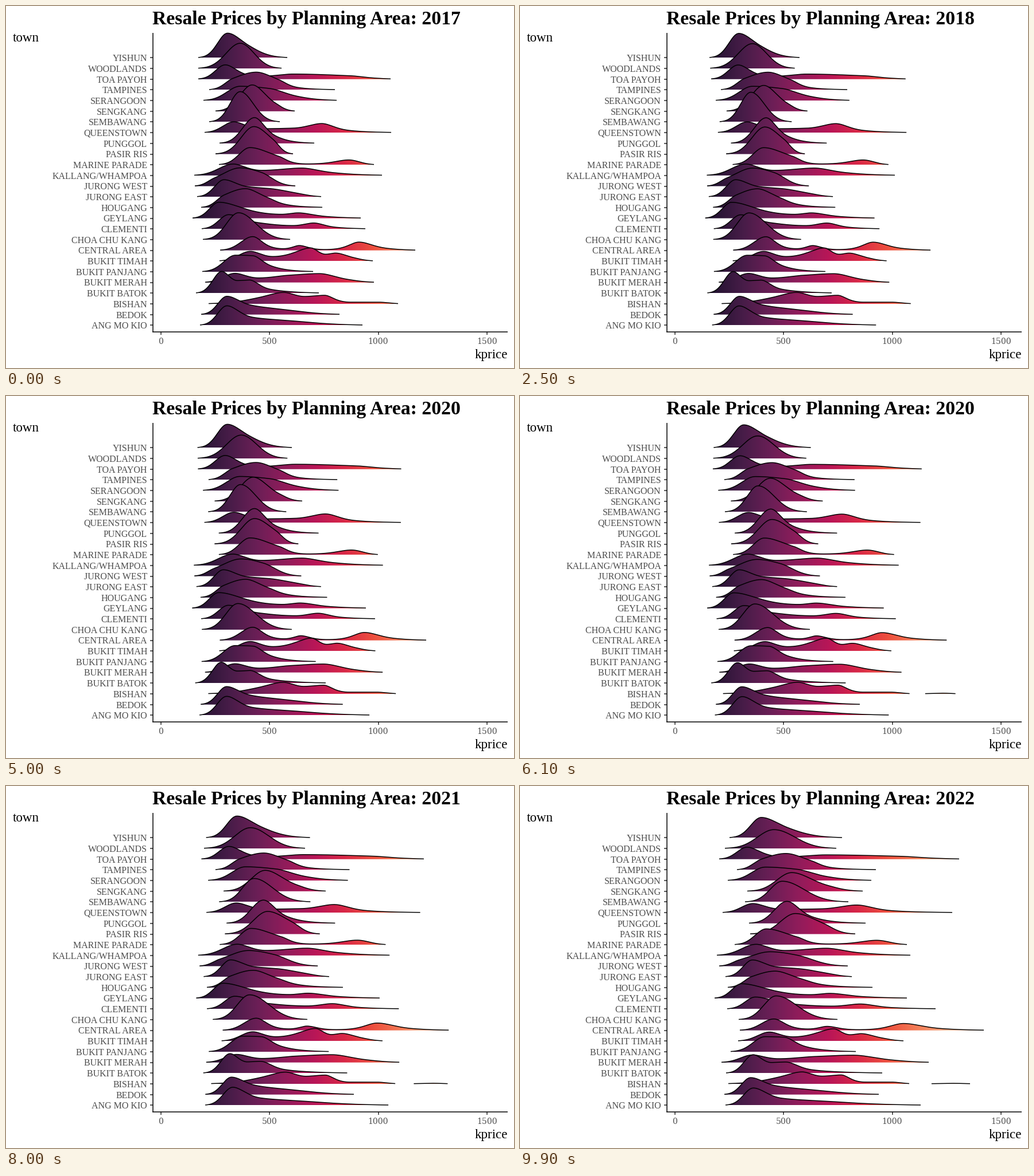
Animation of 885 by 632 pixels, one loop 10000 ms. Source, as a matplotlib script:

```python
import numpy as np
import matplotlib.pyplot as plt
from matplotlib.animation import FuncAnimation
from matplotlib.path import Path

W, H, DPI = 885, 632, 100
FRAMES = 100
LEFT, RIGHT, TOP, FLOOR = 255.5, 874, 47, 568.5
FILL_X = (283, 846)
TRIM = 0.5  # height in px where a ridge is cut off

ROCKET = ["#03051a", "#221331", "#451c47", "#6a1f56", "#921c5b", "#b91657",
          "#d92847", "#ed503e", "#f47d57", "#f6a47b", "#f7c9aa", "#faebdd"]
GREY = "#4d4d4d"

plt.rcParams["font.family"] = "Liberation Serif"
fig = plt.figure(figsize=(W / DPI, H / DPI), dpi=DPI, facecolor="white")
ax = fig.add_axes([0, 0, 1, 1])
ax.axis("off")


def pt(px):
    return px * 72 / DPI


def label(x, y, s, size, **kw):
    return ax.text(x, y, s, fontsize=pt(size), va="baseline", **kw)


def stroke(xs, ys, width, color="black", z=100):
    return ax.plot(xs, ys, color=color, lw=pt(width), zorder=z,
                   solid_capstyle="butt", solid_joinstyle="round")[0]


def base_y(row):
    return 90.4 + 18.68 * row


def make_gradient():
    rgb = np.array([[int(c[i:i + 2], 16) for i in (1, 3, 5)] for c in ROCKET])
    at = np.linspace(0, len(ROCKET) - 1, FILL_X[1] - FILL_X[0])
    cols = [np.interp(at, range(len(ROCKET)), ch) for ch in rgb.T]
    return np.stack(cols, axis=-1).astype(np.uint8)[None]


GRADIENT = make_gradient()


def market(step):
    """Price level and elapsed share: a dip, then a climb, linear within a year."""
    elapsed = step / (FRAMES - 1)
    years = np.linspace(0, 1, 6)
    return np.interp(elapsed, years, years * (2.3 * years - 1.3)), elapsed


def density(x, h, n=180):
    """Monotone cubic through the knots in log height, so tails are Gaussian."""
    y = np.log(h)
    step = np.diff(x)
    sec = np.diff(y) / step
    a, b = sec[:-1], sec[1:]
    same = a * b > 0
    inner = np.where(same, 2 * a * b / np.where(same, a + b, 1), 0)
    d = np.r_[max(2 * sec[0] - inner[0], 0), inner, min(2 * sec[-1] - inner[-1], 0)]
    xs = np.linspace(x[0], x[-1], n)
    k = np.clip(np.searchsorted(x, xs, "right") - 1, 0, len(step) - 1)
    u = (xs - x[k]) / step[k]
    ys = ((1 + 2 * u) * (1 - u) ** 2 * y[k] + u * u * (3 - 2 * u) * y[k + 1]
          + step[k] * u * (1 - u) * ((1 - u) * d[k] - u * d[k + 1]))
    return xs, np.exp(ys)


class Ridge:
    """A town's density; it shifts and stretches while its area stays the same."""

    def __init__(self, row, rise, stretch, knots, since=0):
        self.base, self.rise, self.stretch, self.since = base_y(row), rise, stretch, since
        self.x = np.r_[knots[0], knots[1:-1:2], knots[-1]].astype(float)
        self.h = np.r_[TRIM, knots[2:-1:2], TRIM]
        self.area = np.trapezoid(*density(self.x, self.h)[::-1])
        self.fill = ax.imshow(GRADIENT, aspect="auto", interpolation="nearest",
                              extent=(*FILL_X, self.base, self.base - 60),
                              zorder=2 + row)
        self.line = stroke([], [], 1.5, z=2.5 + row)

    def update(self, step):
        shown = step >= self.since
        self.fill.set_visible(shown)
        self.line.set_visible(shown)
        price, elapsed = market(step)
        along = (self.x - self.x[0]) / (self.x[-1] - self.x[0])
        x = self.x + self.rise * price + self.stretch * (price + elapsed) / 2 * along ** 2
        xs, hs = density(x, self.h)
        ys = self.base - hs * self.area / np.trapezoid(hs, xs)
        self.line.set_data(xs, ys)
        outline = np.c_[np.r_[xs, xs[-1], xs[0]], np.r_[ys, self.base, self.base]]
        self.fill.set_clip_path(Path(outline), ax.transData)


ridges = []
names = []


def town(name, rise, stretch, *knots):
    """Knots of the first year in px: left end, (x, height) pairs, right end."""
    row = len(names)
    names.append(name)
    ridges.append(Ridge(row, rise, stretch, knots))
    stroke([LEFT - 5, LEFT], [base_y(row)] * 2, 1.6, "#333333", 1)
    label(246, base_y(row) + 5.8, name, 16, ha="right", color=GREY)


town("YISHUN", 30, 41, 335, 386, 43, 424, 21, 490)
town("WOODLANDS", 22, 49, 335, 408, 44, 480)
town("TOA PAYOH", 12, 83, 335, 382, 25, 440, 5, 500, 9, 600, 6, 645, 1.8, 670)
town("TAMPINES", 24, 23, 354, 395, 20, 436, 31, 475, 18, 510, 4, 573)
town("SERANGOON", 18, 18, 344, 408, 25, 460, 21, 508, 7.5, 576)
town("SENGKANG", 31, 63, 365, 429, 46, 470, 14, 503)
town("SEMBAWANG", 38, 57, 354, 408, 53, 477)
town("QUEENSTOWN", 7, 75, 346, 397, 19, 445, 7, 500, 8, 550, 16, 598, 4, 671)
town("PUNGGOL", 27, 38, 372, 433, 45, 470, 13, 537)
town("PASIR RIS", 36, 48, 365, 432, 48, 465, 26, 500)
town("MARINE PARADE", 3, 30, 371, 425, 30, 475, 15, 525, 1.5, 597, 8.5, 641)
town("KALLANG/WHAMPOA", 15, 10, 328, 396, 20, 445, 9, 515, 13, 570, 5, 655)
town("JURONG WEST", 18, 49, 329, 362, 14, 408, 32, 445, 24, 504)
town("JURONG EAST", 25, 4, 333, 380, 30, 420, 18, 465, 14, 510, 6, 549)
town("HOUGANG", 22, 41, 340, 380, 22, 417, 33, 455, 18, 490, 5, 551)
town("GEYLANG", 14, 42, 325, 371, 28, 480, 7, 509, 9.5, 560, 3, 618)
town("CLEMENTI", 20, 78, 341, 388, 25, 440, 11, 500, 6, 536, 10.5, 575, 3, 626)
town("CHOA CHU KANG", 38, 20, 343, 405, 47, 495)
town("CENTRAL AREA", 10, 85, 373, 430, 24, 483, 3, 511, 8.5, 555, 1.5, 615, 14.5,
     665, 3.5, 713)
town("BUKIT TIMAH", 8, 21, 372, 426, 17, 465, 8, 531, 23, 557, 12, 574, 14, 606, 6, 639)
town("BUKIT PANJANG", 25, 25, 342, 400, 29, 430, 28, 463, 10, 535)
town("BUKIT MERAH", 4, 67, 347, 399, 16, 440, 8, 490, 12.5, 546, 15.5, 598, 5, 641)
town("BUKIT BATOK", 28, 58, 331, 376, 38, 403, 22, 424, 23, 460, 7, 505, 2, 545)
town("BISHAN", 10, -15, 353, 440, 11, 484, 20, 520, 13, 555, 15, 600, 3, 648, 3, 683)
# a few late, very dear sales form a detached sliver
ridges.append(Ridge(names.index("BISHAN"), 12, 22, (705, 733, 1.4, 750), since=60))
town("BEDOK", 16, 28, 340, 385, 32, 425, 17, 500, 7, 581)
town("ANG MO KIO", 20, 57, 338, 385, 34, 430, 14, 507, 7, 621)

# axes and titles
stroke([LEFT, LEFT], [TOP, FLOOR + 0.7], 1.5)
stroke([LEFT - 0.7, RIGHT], [FLOOR, FLOOR], 1.5)
for value in range(0, 1501, 500):
    x = 270 + 0.3785 * value
    stroke([x, x], [FLOOR, FLOOR + 5], 1.6, "#333333", 1)
    label(x, 590, str(value), 14, ha="center", color=GREY, family="DejaVu Serif")
label(12, 62, "town", 23)
label(RIGHT, 615.5, "kprice", 23, ha="right")
title = label(255, 32, "", 33.8, weight="bold")

ax.set_xlim(0, W)
ax.set_ylim(H, 0)


def update(step):
    year = round(2017 + 5 * step / (FRAMES - 1))
    title.set_text(f"Resale Prices by Planning Area: {year}")
    for r in ridges:
        r.update(step)
    return []


anim = FuncAnimation(fig, update, frames=FRAMES, interval=100, repeat=True)
plt.show()
```
